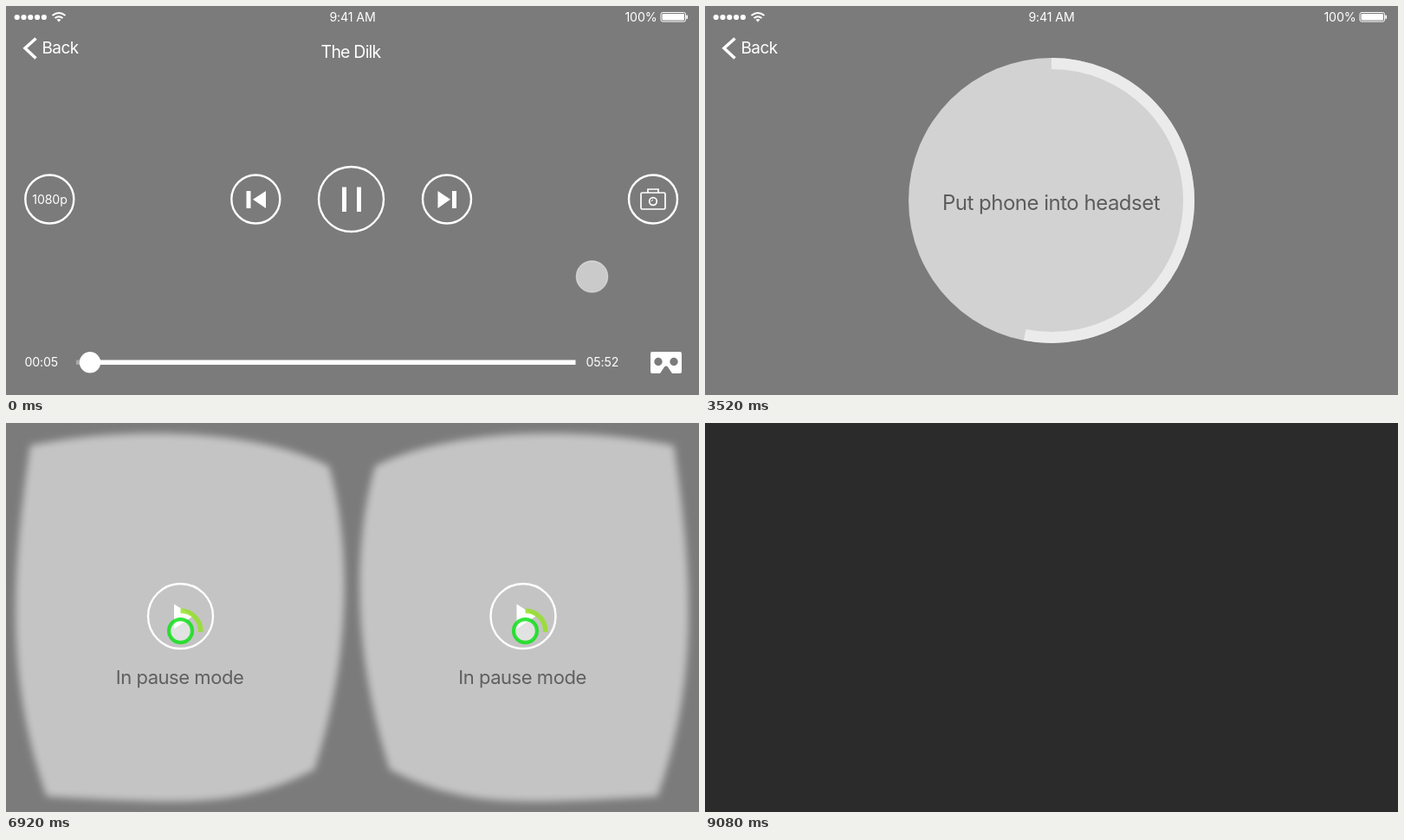
An HTML page for the animation above (9800 ms loop, 800 by 450 pixels).

```html
<!DOCTYPE html>
<html lang="en">
<head>
<meta charset="utf-8">
<title>Headset player flow</title>
<style>
  html, body { margin: 0; width: 100%; height: 100%; overflow: hidden; background: #7b7b7b; }
  svg { display: block; width: 100vw; height: 100vh; }
  text { font-family: Inter, "Open Sans", sans-serif; fill: #fff; }
  .small { font-size: 14.2px; letter-spacing: -.15px; }
  .mid { text-anchor: middle; }
  .note { font-size: 22px; letter-spacing: -.46px; fill: #5f5f5f; text-anchor: middle; }
  .line { fill: none; stroke: #fff; stroke-width: 2.4; }
  .solid { fill: #fff; }
</style>
</head>
<body>
<svg viewBox="0 0 800 450">
  <defs>
    <filter id="soft" filterUnits="userSpaceOnUse" x="-20" y="-20" width="440" height="490">
      <feGaussianBlur stdDeviation="4.3"/>
    </filter>
    <path id="eye" filter="url(#soft)" fill="#c4c4c4"
      d="M28 26C140 3 290 7 373 50C393 120 406 245 356 401C270 445 210 441 47 432C0 300 5 180 28 26Z"/>
    <g id="paused">
      <circle class="line" cx="201.5" cy="223.5" r="37.5"/>
      <path class="solid" d="M194 209.5L216 223.5L194 238Z"/>
      <text class="note" x="200.5" y="301.5">In pause mode</text>
    </g>
    <g id="cursor">
      <circle r="13.4" fill="#fff" fill-opacity=".5" stroke="#06e010" stroke-width="4.2"/>
    </g>
  </defs>

  <rect width="800" height="450" fill="#7b7b7b"/>

  <!-- status bar -->
  <g id="dots" class="solid"></g>
  <g class="line" stroke-width="2">
    <path d="M53.5 11Q61 5 68.5 11" stroke-width="2"/>
    <path d="M56.5 14Q61 10.500 65.500 14" stroke-width="2"/>
  </g>
  <path class="solid" d="M58.500 15.800Q61 14 63.500 15.800L61 18.500Z"/>
  <text class="small mid" x="400" y="18">9:41 AM</text>
  <text class="small" x="714.500" y="18">100%</text>
  <rect x="756" y="7.500" width="28.500" height="10.500" rx="2" fill="none" stroke="#fff"/>
  <rect class="solid" x="757.500" y="9" width="25.500" height="7.500" rx="1"/>
  <rect class="solid" x="785.300" y="10.500" width="1.700" height="4.500" rx=".8"/>

  <path class="line" d="M34.500 37.500L22 48.800L34.500 60.500" style="stroke-width:3.500"/>
  <text x="41.500" y="55.300" font-size="19" letter-spacing="-.6">Back</text>

  <!-- player controls -->
  <g id="controls">
    <text class="mid" x="398" y="60" font-size="19.500" letter-spacing="-.8">The Dilk</text>
    <g id="rings" class="line"></g>
    <text class="small mid" x="50.500" y="228.700">1080p</text>
    <path class="solid" d="M277.500 214h5v20h-5ZM285 223.700L300 214V234ZM388 209.500h5v28.500h-5ZM405 209.500h5v28.500h-5ZM498.500 214L513 223.700L498.500 234ZM515 214h5v20h-5Z"/>
    <g class="line" style="stroke-width:1.700">
      <rect x="733" y="216" width="28" height="19" rx="1.500"/>
      <path d="M741 216V212H753V216"/>
      <circle cx="747" cy="226" r="4.300"/>
      <path d="M747 224.200A2 2 0 0 0 745.200 226" stroke-width="1"/>
    </g>
    <text class="small" x="21.500" y="417">00:05</text>
    <rect x="81" y="409.500" width="16" height="5.500" fill="#a8a8a8"/>
    <rect class="solid" x="97" y="409.500" width="560.500" height="5.500"/>
    <circle class="solid" cx="97" cy="412.300" r="12.200"/>
    <text class="small" x="669.500" y="417">05:52</text>
    <path class="solid" fill-rule="evenodd"
      d="M746 400H778Q780 400 780 402V423Q780 425 778 425H769L764 417.500Q762 415.500 760 417.500L755 425H746Q744 425 744 423V402Q744 400 746 400Z
         M748.300 411.500a4.700 4.700 0 1 0 9.400 0a4.700 4.700 0 1 0 -9.400 0Z
         M766.300 411.500a4.700 4.700 0 1 0 9.400 0a4.700 4.700 0 1 0 -9.400 0Z"/>
    <circle id="touch" fill="#fff" fill-opacity=".6" stroke="#fff" stroke-opacity=".45" stroke-width="1.300"/>
  </g>

  <!-- headset countdown -->
  <g id="countdown">
    <circle cx="400" cy="225" r="165" fill="#d2d2d2"/>
    <path id="timer" fill="none" stroke="#ebebeb" stroke-width="13"/>
    <text x="399.500" y="235.800" class="mid" font-size="24" letter-spacing="-.5" style="fill:#5c5c5c">Put phone into headset</text>
  </g>

  <!-- split view -->
  <g id="split">
    <rect width="800" height="450" fill="#7b7b7b"/>
    <use href="#eye"/>
    <use href="#eye" transform="translate(799 0) scale(-1 1)"/>
    <g id="pausedView">
      <use href="#paused"/>
      <use href="#paused" x="395.500"/>
      <g id="gaze" fill="none" stroke="#92e222" stroke-opacity=".82" stroke-width="5.500">
        <path class="dwell" transform="translate(201.500 240.500)"/>
        <path class="dwell" transform="translate(599.500 240.500)"/>
        <use class="cursor" href="#cursor" x="201.500"/>
        <use class="cursor" href="#cursor" x="599.500"/>
      </g>
    </g>
    <g id="playingView">
      <text class="note" x="200.300" y="235">playing in VR mode</text>
      <text class="note" x="595.800" y="235">playing in VR mode</text>
    </g>
  </g>

  <rect id="dark" width="800" height="450" fill="#2b2b2b"/>
</svg>
<script>
  const LOOP = 9800, STEP = 40;
  const $ = id => document.getElementById(id);
  const clamp = v => Math.min(1, Math.max(0, v));
  const linear = (t, a, b) => clamp((t - a) / (b - a));
  const ease = (t, a, b) => { const p = linear(t, a, b); return p * p * (3 - 2 * p); };
  const mix = (a, b, p) => a + (b - a) * p;
  const show = (id, alpha) => {
    $(id).style.opacity = alpha;
    $(id).style.visibility = alpha > 0 ? 'visible' : 'hidden';
  };

  // Clockwise arc from twelve o'clock, p in 0..1
  function arc(cx, cy, r, p) {
    if (p <= 0) return '';
    const end = Math.min(p, .9999) * 2 * Math.PI;
    const x = cx + r * Math.sin(end), y = cy - r * Math.cos(end);
    return `M${cx} ${cy - r}A${r} ${r} 0 ${p > .5 ? 1 : 0} 1 ${x} ${y}`;
  }

  const circle = (x, y, r) => `<circle cx="${x}" cy="${y}" r="${r}"/>`;
  $('dots').innerHTML = [0, 1, 2, 3, 4].map(i => circle(12.7 + 7.8 * i, 13, 3.1)).join('');
  $('rings').innerHTML = [50.3, 288.3, 398.5, 509, 747]
    .map((x, i) => circle(x, 223.5, i === 2 ? 37.5 : 28)).join('');

  const dwells = document.querySelectorAll('.dwell');
  const cursors = document.querySelectorAll('.cursor');

  function draw(t) {
    const move = ease(t, 440, 1200);
    const press = linear(t, 1480, 1560) * (1 - linear(t, 1600, 1640));
    $('touch').setAttribute('cx', mix(676.5, 762, move));
    $('touch').setAttribute('cy', mix(313, 413, move));
    $('touch').setAttribute('r', mix(18.2, 23.4, press));

    const swap = ease(t, 1800, 2000);
    show('controls', 1 - swap);
    show('countdown', swap);
    $('timer').setAttribute('d', arc(400, 225, 158.5, linear(t, 1827, 5015)));

    show('split', ease(t, 4800, 5000));
    const play = ease(t, 7720, 7920);
    show('pausedView', 1 - play);
    show('playingView', play);

    $('gaze').style.display = t >= 5160 ? '' : 'none';
    const y = mix(323.5, 240.5, linear(t, 5160, 6320));
    cursors.forEach(c => c.setAttribute('y', y));
    const dwell = arc(0, 0, 23.2, linear(t, 6640, 7720));
    dwells.forEach(d => d.setAttribute('d', dwell));

    show('dark', ease(t, 8880, 9080));
  }

  const start = performance.now();
  function frame() {
    const t = (performance.now() - start) % LOOP;
    draw(Math.floor(t / STEP) * STEP);
    requestAnimationFrame(frame);
  }
  frame();
</script>
</body>
</html>
```
